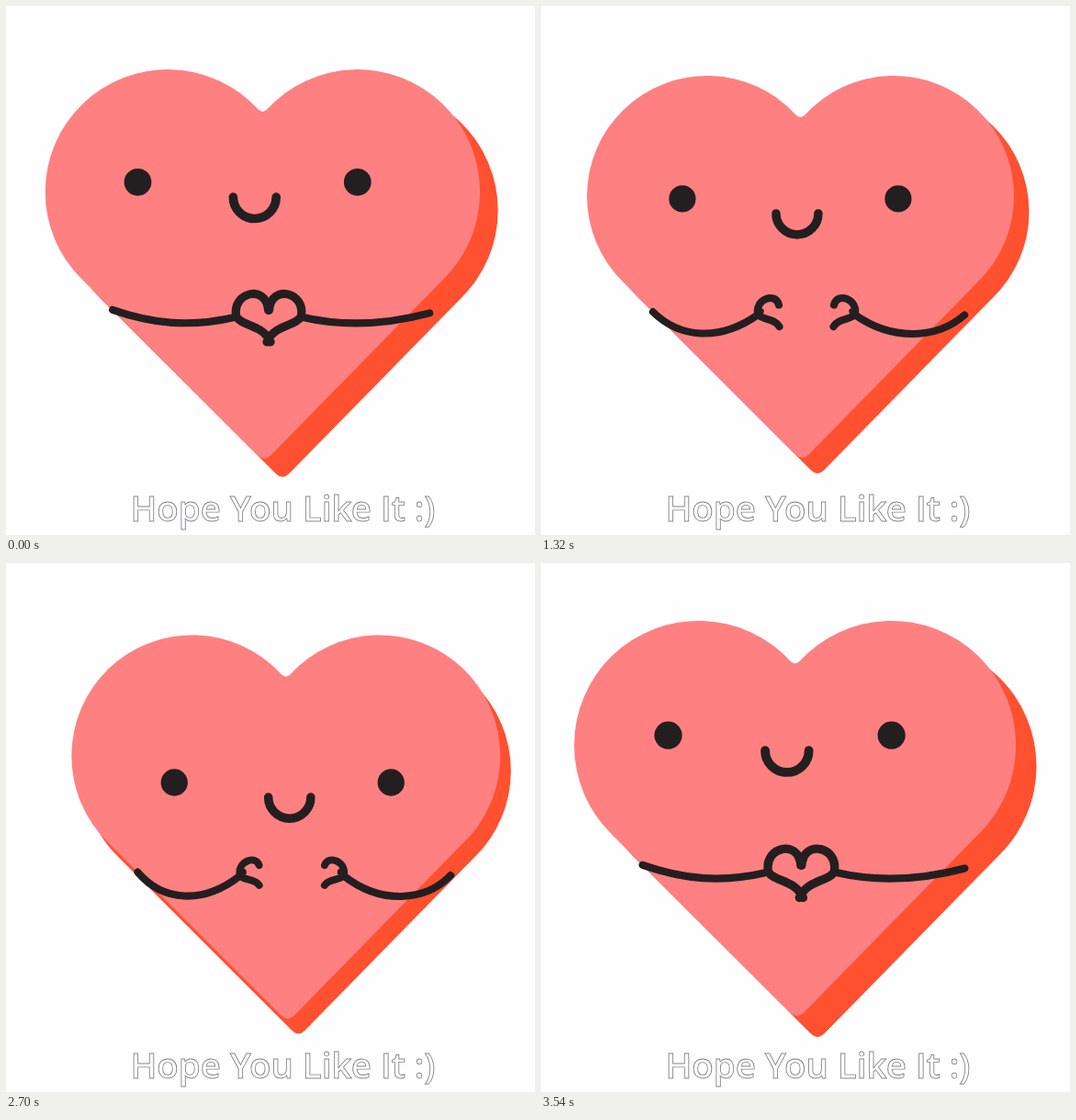
Write an HTML page that moves like this. It is 576 by 576 pixels and loops after 3.6 s.

```html
<!DOCTYPE html>
<html lang="en">
<head>
<meta charset="utf-8">
<title>Happy heart</title>
<style>
  html, body { margin: 0; width: 100%; height: 100%; overflow: hidden; background: #fefdff; }
  svg { display: block; width: 100vw; height: 100vh; }
  .ink { fill: none; stroke: #231f20; stroke-linecap: round; stroke-linejoin: round; }
  .dark { fill: #231f20; }
  .pink { fill: #ff8080; }
  text { font: 600 38.5px "Open Sans", "Noto Sans", sans-serif; text-anchor: middle; fill: #fff; stroke: #858585; stroke-width: .9; }
</style>
</head>
<body>
<svg viewBox="0 0 576 576">
  <defs>
    <path id="heart" d="M278 118.9A131 131 0 1 0 89.4 300.6L277.5 488.5Q284.5 495.5 291.5 488.5L475.6 300.6A131 131 0 1 0 287 118.9Q282.5 123 278 118.9Z"/>
  </defs>
  <g id="back"><use href="#heart" fill="#ff5030"/></g>
  <g id="front">
    <use href="#heart" class="pink"/>
    <g id="face">
      <circle class="dark" cx="-117.5" r="14.6"/>
      <circle class="dark" cx="117.5" r="14.6"/>
      <circle class="pink lid" cx="-117.5" r="15.4"/>
      <circle class="pink lid" cx="117.5" r="15.4"/>
      <path class="ink" stroke-width="9.5" d="M-15.5 16A23 23 0 0 0 30.5 16"/>
    </g>
    <path id="arms" class="ink" stroke-width="8"/>
    <path id="hands" class="ink"/>
    <ellipse id="palmL" class="dark"/>
    <ellipse id="palmR" class="dark"/>
  </g>
  <text x="301.5" y="561">Hope You Like It :)</text>
</svg>
<script>
const LOOP = 3600, STEP = 60, CX = 282.5, CY = 284.5;
const $ = id => document.getElementById(id);
const lids = document.querySelectorAll('.lid');

const clamp = v => Math.max(0, Math.min(1, v));
const mix = (a, b, u) => a + (b - a) * u;
const blend = (a, b, u) => a.map((v, i) => mix(v, b[i], u));

// Smooth step from 0 to 1 between two times.
function ramp(t, from, to) {
  const u = clamp((t - from) / (to - from));
  return u * u * (3 - 2 * u);
}

// Smooth hill of height 1 around a peak, continuing across the loop's end.
function bump(t, peak, rise, fall) {
  if (t < peak - rise) t += LOOP;
  const u = (t - peak) / (t < peak ? rise : fall);
  return Math.abs(u) < 1 ? Math.cos(u * Math.PI / 2) ** 2 : 0;
}

// Each limb is one cubic curve: x, y of start, two controls and end.
const armOpen = [121.5, 333, 122, 393, 172, 403, 197, 345];
const armShut = [122, 333, 165, 348, 205, 348, 254.5, 332];
const fingerOpen = [0, 0, -2, -6, 4, -12, 9, -15];
const fingerShut = [0, 0, -6, -26, 32, -36, 34, -7];
const thumbOpen = [0, 0, 3, 1, 6, -1, 7, -4];
const thumbShut = [0, 0, 6, 10, 28, 8, 36.5, 27];
const HANDS = 578, SHOULDERS = 583;

const curve = p => `M${p[0]} ${p[1]}C${p.slice(2).join(' ')}`;
const mirror = (p, sum) => p.map((v, i) => i % 2 ? v : sum - v);
const shift = (p, x, y) => p.map((v, i) => v + (i % 2 ? y : x));

function place(el, x, y, s) {
  el.setAttribute('transform', `translate(${x} ${y}) scale(${s}) translate(${-CX} ${-CY})`);
}

function drawHeart(t) {
  const beat = bump(t, 420, 175, 175) + bump(t, 1620, 175, 175);
  const breath = bump(t, 2520, 400, 300);
  const squeeze = bump(t, 3000, 220, 200);
  const swell = bump(t, 3240, 200, 500);
  const size = 1 + .05 * beat + .012 * breath - .048 * squeeze + .1 * swell;

  // The body swings right, then down, and springs towards the viewer.
  const swingX = 34 * bump(t, 2820, 300, 310);
  const swingY = 20 * bump(t, 2890, 260, 330);
  place($('back'), CX + 16.5 + .78 * swingX, CY + 17 + .78 * swingY, size);
  place($('front'), CX + swingX - 17 * swell, CY + swingY - 17 * swell, size);
}

function drawFace(t) {
  const bow = ramp(t, 1140, 1560) - ramp(t, 3020, 3240);
  const depth = 34 - 8 * ramp(t, 1740, 2280) + 18 * ramp(t, 2300, 2900);
  const smile = ramp(t, 30, 240) - ramp(t, 1080, 1260);
  $('face').setAttribute('transform',
    `translate(${CX - 16 + 12.5 * bow} ${CY - 88 + depth * bow})`);
  lids.forEach(lid => lid.setAttribute('cy', mix(31, 17.5, smile)));
}

function drawArms(t) {
  const reach = 1 - ramp(t, 1140, 1620) + ramp(t, 1860, 3300);
  const curl = clamp((reach - .3) / .7);
  const drop = 8.5 * (1 - ramp(t, 0, 300) + ramp(t, 3000, 3240));

  const left = blend(armOpen, armShut, reach);
  left[5] += drop / 2;
  left[7] += drop;
  const right = mirror(left, HANDS);
  right[0] += SHOULDERS - HANDS;
  right[1] += 3.5;
  right[2] += SHOULDERS - HANDS;
  $('arms').setAttribute('d', curve(left) + curve(right));

  const [x, y] = left.slice(6);
  const digits = [blend(fingerOpen, fingerShut, curl), blend(thumbOpen, thumbShut, curl)]
    .map(p => shift(p, x, y));
  $('hands').setAttribute('d', digits.map(p => curve(p) + curve(mirror(p, HANDS))).join(''));
  $('hands').setAttribute('stroke-width', mix(7, 9, curl));

  const palm = (el, px, tilt) => {
    el.setAttribute('rx', 7 * (1 - curl));
    el.setAttribute('ry', 9 * (1 - curl));
    el.setAttribute('transform', `translate(${px} ${y - 3}) rotate(${tilt})`);
  };
  palm($('palmL'), x + 3, 25);
  palm($('palmR'), HANDS - x - 3, -25);
}

function draw(t) {
  drawHeart(t);
  drawFace(t);
  drawArms(t);
}

const start = performance.now();
function tick() {
  const t = (performance.now() - start) % LOOP;
  draw(Math.floor(t / STEP) * STEP);
  requestAnimationFrame(tick);
}
draw(0);
requestAnimationFrame(tick);
</script>
</body>
</html>
```
